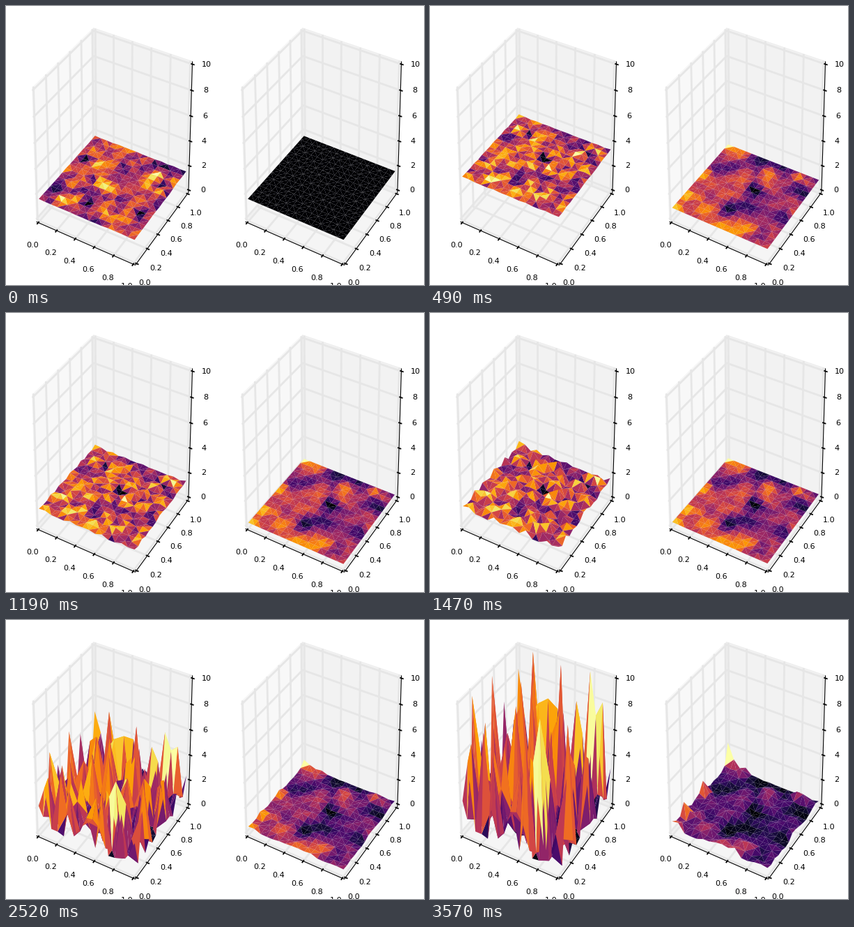
Write a matplotlib script that moves like this. It is 600x400 px and loops after 3.64 s.

```python
import numpy as np
import matplotlib.pyplot as plt
from matplotlib.animation import FuncAnimation
from matplotlib.collections import PolyCollection
from matplotlib.tri import Triangulation

W, H, DPI = 600, 400, 100
FRAMES, INTERVAL = 52, 70
N = 16                              # grid points along each side
PAD = 1 / 48                        # the box is a little larger than the data
ELEV, AZIM, DIST = np.radians(30), np.radians(-60), 10
SCALE, CENTER = (1574, 2104), (154.5, 195.5)

EYE = np.array([np.cos(ELEV) * np.cos(AZIM),
                np.cos(ELEV) * np.sin(AZIM), np.sin(ELEV)])
RIGHT = np.array([-np.sin(AZIM), np.cos(AZIM), 0])
UP = np.cross(EYE, RIGHT)


def project(p, shift=0):
    """Perspective view of points in the unit cube, in stage pixels."""
    q = np.asarray(p, float) - 0.5
    depth = DIST - q @ EYE
    x = CENTER[0] + shift + SCALE[0] * (q @ RIGHT) / depth
    y = CENTER[1] - SCALE[1] * (q @ UP) / depth
    return np.stack([x, y], axis=-1)


# ---- fields -------------------------------------------------------------
rng = np.random.default_rng(7)
I, J = np.meshgrid(np.arange(N), np.arange(N), indexing="ij")
PEAKS = [(0, 15), (0, 3), (0, 8), (3, 14), (8, 13), (12, 14), (6, 9), (11, 2)]
HOLLOWS = [(2, 11), (7, 4), (8, 8), (11, 15)]


def smooth(a):
    p = np.pad(a, 1, mode="edge")
    return (2 * a + p[2:, 1:-1] + p[:-2, 1:-1] + p[1:-1, 2:] + p[1:-1, :-2]) / 6


def unit(a):
    return (a - a.mean()) / a.std()


start = rng.normal(size=(N, N))
noise = rng.normal(size=(N, N))
for i, j in HOLLOWS:
    noise -= np.exp(-((I - i) ** 2 + (J - j) ** 2) / 3)
for i, j in PEAKS:
    noise[i, j] = 3

# neighbours compete for the spikes, the slow field spreads over them
spiky = 1.08 * np.tanh(0.9 * unit(noise - 0.8 * smooth(noise))) - 0.08
spread = unit(smooth(noise))


def logistic(k, top, middle):
    return top / (1 + np.exp(-0.2 * (k - middle)))


def ease(k, times, values):
    n = min(np.searchsorted(times, k, side="right") - 1, len(times) - 2)
    s = np.clip((k - times[n]) / (times[n + 1] - times[n]), 0, 1)
    return values[n] + (values[n + 1] - values[n]) * (1 - np.cos(np.pi * s)) / 2


def activator(k):
    mean = ease(k, [0, 7, 13, 21], [1.6, 3.37, 1.2, 1.5])
    fading = 0.012 * np.exp(-k / 4) * start
    return mean * np.exp(logistic(k, 2, 32.5) * spiky + fading)


def inhibitor(k):
    mean = np.interp(k, [0, 7, 13, 21, 51], [1.6, 0.88, 0.2, 0.28, 0.38])
    return mean * np.exp((k > 0) * logistic(k, 0.47, 37) * spread)


# ---- stage --------------------------------------------------------------
fig = plt.figure(figsize=(W / DPI, H / DPI), dpi=DPI, facecolor="white")
ax = fig.add_axes([0, 0, 1, 1])
ax.set_xlim(0, W)
ax.set_ylim(H, 0)
ax.axis("off")


def line(points, shift, color, px, z, cap="butt"):
    x, y = project(points, shift).T
    ax.plot(x, y, color=color, lw=px * 72 / DPI, zorder=z,
            solid_capstyle=cap, solid_joinstyle="round")


def label(point, shift, offset, text):
    x, y = project(point, shift) + offset
    ax.text(x, y, text, fontsize=8, family="DejaVu Sans",
            ha="center", va="center", zorder=2)


def draw_box(shift):
    a, b = -PAD, 1 + PAD
    panes = [([(a, a, a), (a, b, a), (a, b, b), (a, a, b)], 0.95),
             ([(a, b, a), (b, b, a), (b, b, b), (a, b, b)], 0.90),
             ([(a, a, a), (b, a, a), (b, b, a), (a, b, a)], 0.925)]
    for corners, gray in panes:
        ax.fill(*project(corners, shift).T, facecolor=str(gray),
                edgecolor=str(gray), alpha=0.5, lw=0.8, zorder=0)

    for path in ([(a, a, a), (b, a, a)], [(b, a, a), (b, b, a)],
                 [(b, b, a), (b, b, b)]):
        line(path, shift, "black", 1.1, 2)

    inner, outer = 0.1 / 12, 0.2 / 12
    for t in np.linspace(0, 1, 6):
        for path in ([(t, a, a), (t, b, a), (t, b, b)],
                     [(b, t, a), (a, t, a), (a, t, b)],
                     [(a, a, t), (a, b, t), (b, b, t)]):
            line(path, shift, "0.9", 2.8, 1)
        for mark in ([(t, a + inner, a), (t, a - outer, a)],
                     [(b - inner, t, a), (b + outer, t, a)],
                     [(b - inner, b, t), (b + outer, b, t)]):
            line(mark, shift, "black", 1.8, 2, "projecting")
        label((t, a, a), shift, (-8.7, 32), f"{t:.1f}")
        label((b, t, a), shift, (12, 27.5), f"{t:.1f}")
        label((b, b, t), shift, (20.3, 0.2), f"{10 * t:.0f}")


grid_x, grid_y = I.ravel() / (N - 1), J.ravel() / (N - 1)
triangles = Triangulation(grid_x, grid_y).triangles


class Surface:
    def __init__(self, field, shift):
        self.field, self.shift = field, shift
        self.faces = PolyCollection([], cmap="inferno", edgecolors="none",
                                    linewidths=0, antialiased=True, zorder=3)
        ax.add_collection(self.faces, autolim=False)

    def update(self, k):
        z = self.field(k).ravel()
        points = np.column_stack([grid_x, grid_y, z / 10])
        order = np.argsort((points @ EYE)[triangles].mean(axis=1))
        tri = triangles[order]
        heights = z[tri].mean(axis=1)
        low, high = heights.min(), heights.max()
        if high - low < 1e-9:           # a flat sheet takes the lowest colour
            heights, high = np.full_like(heights, low), low + 1
        self.faces.set_verts(project(points, self.shift)[tri])
        self.faces.set_array(heights)
        self.faces.set_clim(low, high)
        return self.faces


surfaces = [Surface(activator, 0), Surface(inhibitor, 300)]
for s in surfaces:
    draw_box(s.shift)


def update(k):
    return [s.update(k) for s in surfaces]


anim = FuncAnimation(fig, update, frames=FRAMES, interval=INTERVAL,
                     repeat=True, repeat_delay=0, blit=False)
plt.show()
```
